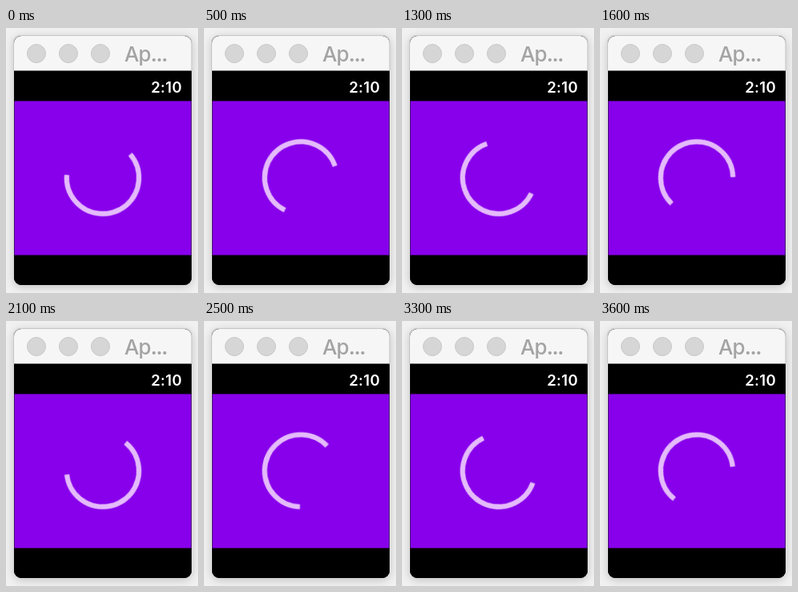
Animation, 240 px wide and 332 px high, one loop 3.7 s. Source, as an HTML page:

```html
<!DOCTYPE html>
<html lang="en">
<head>
<meta charset="utf-8">
<title>Spinner</title>
<style>
  html, body { margin: 0; width: 100%; height: 100%; overflow: hidden; background: #f1f1f1; }
  svg { display: block; width: 240px; height: 332px; }
  text { font-family: Inter, "Liberation Sans", sans-serif; }
  .window { filter: drop-shadow(0 2px 6px rgba(0, 0, 0, .22)); }
  .lights circle { fill: #d6d6d6; stroke: #c8c8c8; }
  .title { font-size: 26px; font-weight: 500; letter-spacing: -.9px; fill: #a3a3a3; }
  .dots { font-weight: 600; letter-spacing: -1.5px; }
  .clock { font-size: 18.6px; font-weight: 600; letter-spacing: .3px; fill: #fff; text-anchor: end; }
  .arc {
    fill: none;
    stroke: #e4bbfb;
    stroke-width: 6.2;
    stroke-dasharray: 225 135;
    transform-origin: 121px 187.6px;
    animation: spin 3700ms infinite;
  }
  /* One step every 100 ms, with a hard cut at the loop */
  @keyframes spin {
    0%       { transform: rotate(-40.5deg);  animation-timing-function: steps(9); }
    24.3243% { transform: rotate(241.5deg);  animation-timing-function: steps(7); }
    43.2432% { transform: rotate(494deg);    animation-timing-function: steps(5); }
    56.7568% { transform: rotate(669deg);    animation-timing-function: steps(4); }
    67.5676% { transform: rotate(811.5deg);  animation-timing-function: steps(5); }
    81.0811% { transform: rotate(991deg);    animation-timing-function: steps(6); }
    97.2973% { transform: rotate(1208.5deg); animation-timing-function: steps(1); }
    100%     { transform: rotate(1244.5deg); }
  }
</style>
</head>
<body>
<svg viewBox="0 0 240 332">
  <defs>
    <clipPath id="frame"><rect x="10" y="10" width="222" height="312" rx="9"/></clipPath>
  </defs>
  <rect width="240" height="332" fill="#f1f1f1"/>
  <rect class="window" x="10" y="10" width="222" height="312" rx="9"/>
  <g clip-path="url(#frame)">
    <rect x="10" y="10" width="222" height="312"/>
    <rect x="10" y="10" width="222" height="43.5" fill="#f6f6f6"/>
    <rect x="10.5" y="91.5" width="221" height="193" fill="#8800eb"/>
  </g>
  <path d="M9.5 53.5V18a8 8 0 0 1 8-8.5H224a8 8 0 0 1 8 8.5V53.5" fill="none" stroke="#c6c6c6"/>
  <g class="lights">
    <circle cx="38" cy="32" r="11.5"/>
    <circle cx="78" cy="32" r="11.5"/>
    <circle cx="118" cy="32" r="11.5"/>
  </g>
  <text class="title" x="148" y="42">Ap<tspan class="dots">...</tspan></text>
  <text class="clock" x="220" y="80.5">2:10</text>
  <circle class="arc" cx="121" cy="187.6" r="45.2" pathLength="360"/>
</svg>
</body>
</html>
```
